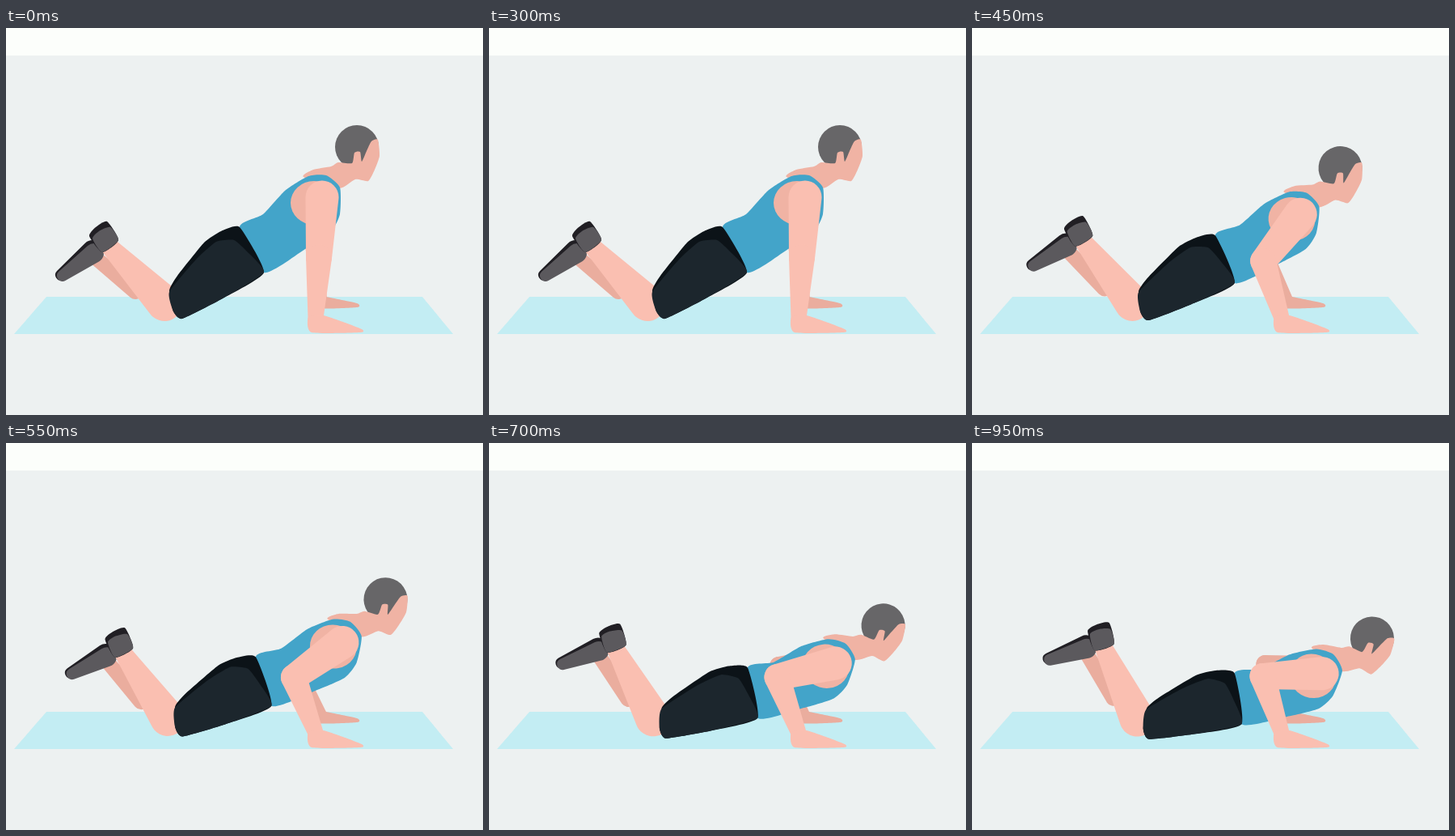
These frames come from a looping animation (590 px wide and 478 px high, 1000 ms). An HTML page with a canvas:

```html
<!DOCTYPE html>
<html lang="en">
<head>
<meta charset="utf-8">
<title>Knee push-up</title>
<style>
  html, body { margin: 0; width: 100%; height: 100%; overflow: hidden; background: #edf1f1; }
  canvas { display: block; }
</style>
</head>
<body>
<canvas id="stage" width="590" height="478"></canvas>
<script>
const ctx = document.getElementById('stage').getContext('2d');
const SKIN = '#fabfb1', SHADE = '#eaad9e', FACE = '#f0b3a4';
const BLUE = '#43a4c9', SOLE = '#211f24', SHOE = '#5b595d', HAIR = '#676668';
const LOOP = 1000, STEP = 50, KNEE = { x: 213, y: 360 };
const SHIN_TURN = 18.8 * Math.PI / 180, BODY_TURN = 20.2 * Math.PI / 180;

// Closed curve through the points; a bend of 0 gives straight edges.
function shape(color, points, bend = .1) {
  const n = points.length;
  const at = i => points[(i + n) % n];
  ctx.fillStyle = color;
  ctx.beginPath();
  ctx.moveTo(...points[0]);
  for (let i = 0; i < n; i++) {
    const [a, b, c, d] = [at(i - 1), at(i), at(i + 1), at(i + 2)];
    ctx.bezierCurveTo(
      b[0] + (c[0] - a[0]) * bend, b[1] + (c[1] - a[1]) * bend,
      c[0] - (d[0] - b[0]) * bend, c[1] - (d[1] - b[1]) * bend, ...c);
  }
  ctx.fill();
}

function oval(color, x, y, rx, ry = rx) {
  ctx.fillStyle = color;
  ctx.beginPath();
  ctx.ellipse(x, y, rx, ry, 0, 0, Math.PI * 2);
  ctx.fill();
}

// Tapered limb: the hull of two circles.
function limb(color, [x1, y1], r1, [x2, y2], r2) {
  const dir = Math.atan2(y2 - y1, x2 - x1);
  const spread = Math.acos((r1 - r2) / Math.hypot(x2 - x1, y2 - y1));
  ctx.fillStyle = color;
  ctx.beginPath();
  ctx.arc(x1, y1, r1, dir + spread, dir - spread + Math.PI * 2);
  ctx.arc(x2, y2, r2, dir - spread, dir + spread);
  ctx.fill();
}

// Position of a body point after the body has turned about the knee.
function turned([x, y], p) {
  const c = Math.cos(BODY_TURN * p), s = Math.sin(BODY_TURN * p);
  const dx = x - KNEE.x, dy = y - KNEE.y;
  return [KNEE.x + p + dx * c - dy * s, KNEE.y + 5 * p + dx * s + dy * c];
}

function aboutKnee(angle, p, paint) {
  ctx.save();
  ctx.translate(KNEE.x + p, KNEE.y + 5 * p);
  ctx.rotate(angle * p);
  ctx.translate(-KNEE.x, -KNEE.y);
  paint();
  ctx.restore();
}

// Two bones of equal length, the elbow bending backwards.
function elbowOf([sx, sy], [wx, wy], bone) {
  const dx = wx - sx, dy = wy - sy, span = Math.hypot(dx, dy);
  const out = Math.sqrt(Math.max(0, bone * bone - span * span / 4)) / span;
  return [(sx + wx) / 2 - dy * out, (sy + wy) / 2 + dx * out];
}

function arm(color, shoulder, wrist, bone, [r1, r2, r3]) {
  const elbow = elbowOf(shoulder, wrist, bone);
  limb(color, shoulder, r1, elbow, r2);
  limb(color, elbow, r2, wrist, r3);
}

function drawFarArm(p) {
  arm(SHADE, turned([385, 200], p), [389, 336], 68.3, [11, 11, 8]);
  shape(SHADE, [[384, 330], [396, 332], [434, 340], [434, 345], [384, 346]]);
}

function drawNearArm(p) {
  arm(SKIN, turned([391, 209], p), [383, 358], 73.8, [20.5, 16, 9.5]);
  shape(SKIN, [[374, 357], [392, 355], [414, 362], [440, 372], [438, 376], [378, 376]]);
}

function drawShins() {
  limb(SHADE, [160, 325], 10, [112, 285], 9);
  limb(SOLE, [107, 275], 13, [68, 305], 7);
  limb(SHOE, [109, 278], 12, [70, 306], 7);
  limb(SKIN, [196, 340], 22, [129, 271], 11);
  shape(SOLE, [[103, 257], [111, 246], [125, 239], [139, 262], [119, 277]]);
  shape(SHOE, [[107, 260], [115, 251], [129, 246], [139, 262], [119, 277]]);
}

function drawHead() {
  oval(HAIR, 434, 147, 27);
  shape(FACE, [
    [460, 138], [462, 158], [456, 175], [448, 189], [432, 187], [412, 198], [368, 184], [380, 175],
    [402, 171], [411, 166], [428, 167], [431, 154], [438, 153], [440, 165], [446, 152], [452, 140]]);
}

function drawTorso() {
  shape(BLUE, [
    [289, 246], [318, 230], [345, 201], [374, 183], [396, 182],
    [413, 197], [413, 230], [402, 251], [370, 273], [319, 302]]);
  oval(FACE, 381, 216, 29, 27);
}

function drawShorts() {
  const under = [[319, 302], [268, 334], [218, 359], [207, 350]];
  shape('#0c1318', [[202, 324], [212, 306], [245, 265], [266, 251], [289, 246], ...under], .08);
  shape('#1c262d', [[202, 326], [235, 286], [260, 264], [282, 262], [299, 277], ...under], .08);
}

function draw(t) {
  const p = Math.min(1, Math.max(0, (t - 312) / 460));

  ctx.fillStyle = '#edf1f1';
  ctx.fillRect(0, 0, 590, 478);
  ctx.fillStyle = '#fcfefb';
  ctx.fillRect(0, 0, 590, 34);
  shape('#c3edf3', [[50, 332], [515, 332], [553, 378], [10, 378]], 0);

  drawFarArm(p);
  aboutKnee(SHIN_TURN, p, drawShins);
  aboutKnee(BODY_TURN, p, () => {
    drawHead();
    drawTorso();
    drawShorts();
  });
  drawNearArm(p);
}

const start = performance.now();
function tick() {
  const t = (performance.now() - start) % LOOP;
  draw(Math.floor(t / STEP) * STEP);
  requestAnimationFrame(tick);
}
tick();
</script>
</body>
</html>
```
